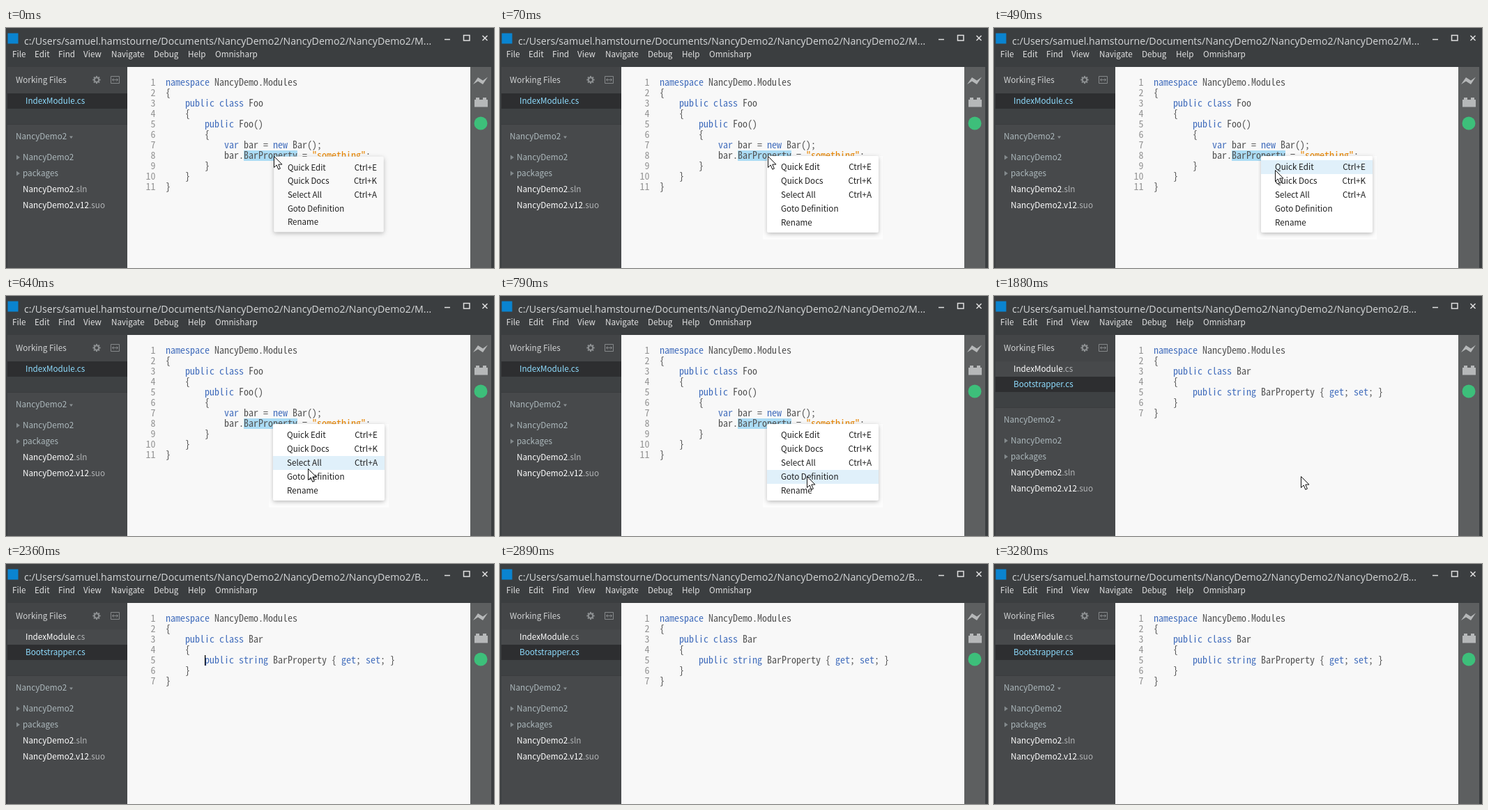
Write an HTML page that moves like this. It is 700 px wide and 345 px high and loops after 3350 ms.

```html
<!DOCTYPE html>
<html lang="en">
<head>
<meta charset="utf-8">
<title>Goto definition</title>
<style>
  html, body { margin: 0; width: 100%; height: 100%; overflow: hidden; background: #3b3e40; }
  svg { display: block; width: 700px; height: 345px; }
  text { white-space: pre; }
  .ui { font: 11.7px "Noto Sans CJK JP", "Noto Sans CJK SC", Lato, sans-serif; }
  .bar { fill: #e2e2e2; }
  .title { font: 14.15px "Open Sans", "Noto Sans", sans-serif; fill: #d6d8d9; }
  .code {
    font-family: "Noto Sans Mono CJK JP", "Noto Sans Mono CJK SC", "Noto Sans Mono", monospace;
    font-size: var(--code, 11.667px);
    fill: #535353;
  }
  .num { fill: #949494; text-anchor: end; }
  .kw { fill: #446fbd; }
  .str { fill: #e88501; }
  .head { fill: #d0d2d3; }
  .dir { fill: #adb9bd; }
  .file { fill: #fff; }
  .ext { fill: #b2b4b6; }
  .active, .active .ext { fill: #8fddff; }
  .menu text { fill: #1e1e1e; }
  .keys { text-anchor: end; }
  .panel { filter: drop-shadow(0 2px 3px rgba(0, 0, 0, .26)); }
</style>
</head>
<body>
<svg id="stage" viewBox="0 0 700 345"></svg>
<script>
const LOOP = 3350;
const STEP = 30;
const CHAR = 7;
const LINE = 15;

const fooCode = [
  'namespace NancyDemo.Modules', '{', '    public class Foo', '    {',
  '        public Foo()', '        {', '            var bar = new Bar();',
  '            bar.BarProperty = "something";', '        }', '    }', '}'
];
const barCode = [
  'namespace NancyDemo.Modules', '{', '    public class Bar', '    {',
  '        public string BarProperty { get; set; }', '    }', '}'
];
const bars = [['File', 9], ['Edit', 41], ['Find', 75], ['View', 111],
  ['Navigate', 151], ['Debug', 212], ['Help', 261], ['Omnisharp', 300]];
const items = [['Quick Edit', 'Ctrl+E'], ['Quick Docs', 'Ctrl+K'],
  ['Select All', 'Ctrl+A'], ['Goto Definition', ''], ['Rename', '']];

// Pointer tip: [time, x, y]
const pathIn = [[400, 384, 184], [490, 403, 204], [640, 433, 248], [790, 440, 259]];
const pathOut = [[2150, 440, 259], [2240, 330, 285], [2330, 6, 272]];

const rect = (x, y, w, h, fill, more = '') =>
  `<rect x="${x}" y="${y}" width="${w}" height="${h}" fill="${fill}" ${more}/>`;
const text = (x, y, cls, s) => `<text x="${x}" y="${y}" class="${cls}">${s}</text>`;
const path = (d, more) => `<path d="${d}" ${more}/>`;
const fileName = s => {
  const dot = s.lastIndexOf('.');
  return `${s.slice(0, dot)}<tspan class="ext">${s.slice(dot)}</tspan>`;
};

function paint(line) {
  return line.trim().replace(/"[^"]*"|\b(namespace|public|class|string|var|new|get|set)\b/g,
    m => `<tspan class="${m[0] === '"' ? 'str' : 'kw'}">${m}</tspan>`);
}

function listing(lines) {
  return lines.map((line, i) => {
    const y = 83 + i * LINE;
    const x = 229 + line.search(/\S/) * CHAR;
    return text(214.5, y, 'code num', i + 1) + text(x, y, 'code', paint(line));
  }).join('');
}

function gear(cx, cy) {
  let teeth = '';
  for (let i = 0; i < 8; i++)
    teeth += rect(cx - 1, cy - 5.6, 2, 3, '#8c8f91', `transform="rotate(${i * 45} ${cx} ${cy})"`);
  return teeth + `<circle cx="${cx}" cy="${cy}" r="3.2" fill="none" stroke="#8c8f91" stroke-width="2"/>`;
}

function chrome() {
  const line = 'fill="none" stroke="#e0e0e0" stroke-width="1.5"';
  const thin = 'fill="none" stroke="#85888a"';
  return rect(0, 0, 700, 345, '#3b3e40')
    + rect(2, 56, 172, 289, '#47494b')
    + rect(2, 56, 172, 38, '#434547')
    + rect(174, 56, 492, 289, '#f8f8f8')
    + rect(666, 56, 30, 289, '#5d5f60')
    + rect(2.5, 7.5, 15, 15, '#0a84d0')
    + path('M629 16.5h8', line)
    + path('M656.5 10.5h8.5v7.5h-8.5z', line)
    + path('M683.5 11l7 7m0-7l-7 7', line)
    + bars.map(([s, x]) => text(x, 42, 'ui bar', s)).join('')
    + text(14, 79, 'ui head', 'Working Files')
    + gear(130, 74.5)
    + path('M150.5 69.5h12v10h-12z', thin)
    + path('M152.5 74.5h8m-6-2l-2 2 2 2m4-4l2 2-2 2', thin)
    + path('M670 81l7-10 7 4.5 7-5-7 10.5-7-4.5z', 'fill="#b6b8b9"')
    + path('M672 103h2v-3h5v3h5v-3h5v3h2v10.5h-19z', 'fill="#b6b8b9"')
    + '<circle cx="681" cy="137" r="9.5" fill="#3dbf7a"/>';
}

function tree() {
  const row = (s, y) => path(`M15 ${y - 7.5}l5 3.5-5 3.5z`, 'fill="#83898c"') + text(24, y, 'ui dir', s);
  return rect(2, 138, 172, 1, '#3a3c3e')
    + text(14, 160, 'ui dir', 'NancyDemo2')
    + path('M91 155.5h5l-2.5 3.5z', 'fill="#8b9194"')
    + row('NancyDemo2', 190) + row('packages', 213)
    + text(24, 236, 'ui file', fileName('NancyDemo2.sln'))
    + text(24, 259, 'ui file', fileName('NancyDemo2.v12.suo'));
}

function menu() {
  const rows = items.map(([s, keys], i) => {
    const y = 204 + i * 20;
    return text(403, y, 'ui', s) + text(533, y, 'ui keys', keys);
  }).join('');
  return rect(383, 184, 160, 110, '#fff', 'rx="2" class="panel" id="panel"')
    + rect(383, 190, 160, 20, '#e0f0fa', 'id="hover"') + rows;
}

document.getElementById('stage').innerHTML = chrome()
  + '<text id="title" x="26" y="23.5" class="title"></text>'
  + `<g id="mark">${rect(2, 94, 172, 22, '#2d2e30')}${rect(2, 116, 172, 22, '#3e4143')}</g>`
  + `<text id="index" x="28" y="108.5" class="ui">${fileName('IndexModule.cs')}</text>`
  + `<text id="boot" x="28" y="131" class="ui active">${fileName('Bootstrapper.cs')}</text>`
  + `<g id="tree">${tree()}</g>`
  + `<g id="foo">${rect(377, 184, 172, 120, '#fdfdfd', 'id="halo"')}`
  + rect(341, 176, 77, 15, '#abdcf5') + listing(fooCode) + '</g>'
  + `<g id="bar">${listing(barCode)}${rect(285, 131, 1.3, 15, '#000', 'id="caret"')}</g>`
  + `<g id="menu" class="menu">${menu()}</g>`
  + '<g id="pointer">'
  + path('M0 0v16l3.7-3.5 2.6 6.2 2.6-1.1-2.6-6h5.2z',
    'fill="#fff" stroke="#111" stroke-linejoin="round"') + '</g>';

const el = {};
for (const node of document.querySelectorAll('[id]')) el[node.id] = node;
const show = (node, on) => node.setAttribute('display', on ? 'inline' : 'none');

// Choose the code size whose character cell is CHAR wide
function fitCode() {
  const pen = document.createElement('canvas').getContext('2d');
  pen.font = `100px ${getComputedStyle(document.querySelector('.code')).fontFamily}`;
  el.stage.style.setProperty('--code', `${CHAR * 100 / pen.measureText('0').width}px`);
}

function along(keys, t) {
  if (t <= keys[0][0]) return keys[0].slice(1);
  for (let i = 1; i < keys.length; i++) {
    const [t0, x0, y0] = keys[i - 1], [t1, x1, y1] = keys[i];
    if (t <= t1) {
      const k = (t - t0) / (t1 - t0);
      return [x0 + (x1 - x0) * k, y0 + (y1 - y0) * k];
    }
  }
  return keys[keys.length - 1].slice(1);
}

function draw(t) {
  const opened = t >= 1320;
  const menuOn = t < 1290;
  const tick = 10 + Math.floor((t - 10) / STEP) * STEP;
  const [x, y] = along(t < 2000 ? pathIn : pathOut, t < 2000 ? tick : tick + 10);
  const shift = `translate(0 ${opened ? 22 : 0})`;

  el.title.textContent =
    `c:/Users/samuel.hamstourne/Documents/NancyDemo2/NancyDemo2/NancyDemo2/${opened ? 'B' : 'M'}...`;
  el.mark.setAttribute('transform', shift);
  el.tree.setAttribute('transform', shift);
  el.index.setAttribute('class', opened ? 'ui file' : 'ui active');
  show(el.boot, opened);
  show(el.foo, !opened);
  show(el.bar, opened);
  show(el.halo, menuOn && t >= 70);
  show(el.caret, (t >= 1350 && t < 1880) || (t >= 2360 && t < 2890));

  const scale = t < 30 ? 0.985 : t < 70 ? 0.995 : 1;
  show(el.menu, menuOn);
  el.menu.setAttribute('transform', `translate(463 239) scale(${scale}) translate(-463 -239)`);
  el.panel.setAttribute('fill', scale < 1 ? '#f9f9f9' : '#fff');
  const row = Math.floor((y - 190) / 20);
  show(el.hover, menuOn && row >= 0);
  el.hover.setAttribute('y', 190 + Math.max(0, row) * 20);

  show(el.pointer, t < 2360);
  el.pointer.setAttribute('transform', `translate(${Math.round(x) + 0.5} ${Math.round(y) + 0.5})`);
}

fitCode();
const start = performance.now();
function frame() {
  draw((performance.now() - start) % LOOP);
  requestAnimationFrame(frame);
}
frame();
</script>
</body>
</html>
```
